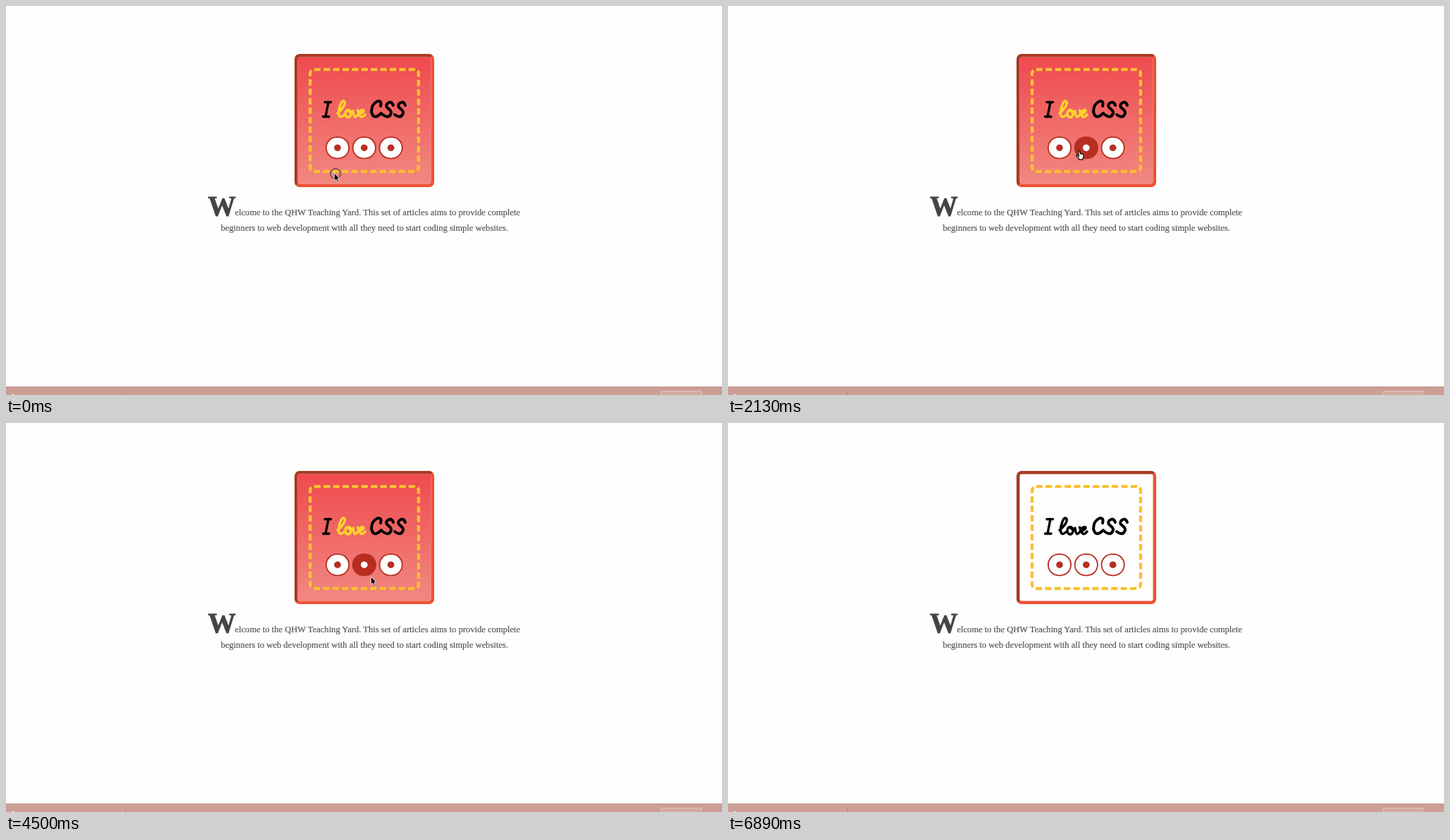
These frames come from a looping animation (1015x552 px, 7640 ms). An HTML page:

```html
<!DOCTYPE html>
<html lang="en">
<head>
<meta charset="utf-8">
<title>Card hover demo</title>
<style>
  html, body { margin: 0; width: 100%; height: 100%; overflow: hidden; background: #fefefe; }
  .card, .frame { position: absolute; box-sizing: border-box; }
  .card {
    left: 409px; top: 68.3px; width: 220px; height: 210px;
    transform: scale(.9); transform-origin: 0 0;
    border: 5px solid; border-color: #a93a24 #ee5232 #ee5232 #a93a24; border-radius: 8px;
  }
  .card.hover { background: linear-gradient(#ef484d, #f18a82) border-box; }
  .frame { left: 17px; top: 17px; width: 176px; height: 166px; border: 5px dashed #fbc02f; border-radius: 9px; }
  .bar { position: absolute; left: 0; top: 540px; width: 100%; height: 12px; background: #cd9e96; box-shadow: inset 0 1px #bb9089; overflow: hidden; }
  .bar i { position: absolute; box-sizing: border-box; }
  .divider { left: 169px; top: 6px; width: 1px; height: 6px; background: #b38881; }
  .mark { left: 8px; top: 11px; width: 4px; height: 1px; background: #f5e6e3; }
  .action { left: 928px; top: 6px; width: 59px; height: 20px; background: #d3a9a2; border: 1px solid #e2c3be; border-radius: 2px; }
  svg { position: absolute; left: 0; top: 0; }
  .title { fill: none; stroke: #000; stroke-width: 4; stroke-linecap: round; stroke-linejoin: round; }
  .copy { font: 12.55px "Liberation Serif", serif; fill: #555; stroke: #555; stroke-width: .2; }
  .initial { font: bold 39.5px "Liberation Serif", serif; fill: #444; stroke: #444; stroke-width: .8; }
</style>
</head>
<body>
<div class="card" id="card"><div class="frame"></div></div>
<div class="bar"><i class="divider"></i><i class="mark"></i><i class="action"></i></div>
<svg width="1015" height="552" viewBox="0 0 1015 552">
  <g class="title" role="img" aria-label="I love CSS">
    <path stroke-width="3.4" d="M452 136.5H460.5M449.5 157H458M457 136.5L453 157"/>
    <path id="love" stroke-width="3.5" d="M470 152Q482 142 480 136Q476 131 472 147Q470 163 480 154
      M485 147.5a4 5.2 0 1 0 .1 0Q487 153 492 149Q493 157 495 157.5Q502 154 498.5 148
      Q500 152 503 152.5Q509 149 506 147.5Q500 148 501 154Q504 161 509 154"/>
    <path d="M531 142Q533 134 527 135Q518 139 518 150Q521 163 532 152"/>
    <path id="s" d="M549 141q-3-8-9-2c-4 6 7 7 6 13q-3 9-12 2"/>
    <use href="#s" x="17"/>
  </g>
  <g id="buttons"></g>
  <text class="initial" x="286.3" y="297.3">W</text>
  <text class="copy" x="324.5" y="297">elcome to the QHW Teaching Yard. This set of articles aims to provide complete</text>
  <text class="copy" x="304.5" y="319">beginners to web development with all they need to start coding simple websites.</text>
  <g id="pointer">
    <circle id="ring" cx="2" cy="1" r="7.2" fill="none" stroke="#222"/>
    <path id="arrow" d="M.3 0V11L3 9L5 13L6.5 12L5 8H8Z" fill="#000" stroke="#fff" stroke-width=".8"/>
    <path id="hand" d="M-1 1Q0-.6 1 1L2 4.4L5 5Q8 6 5.7 10.5V12.6H0V11L-3.6 7.5Q-3.5 5 0 8Z" fill="#fff" stroke="#000" stroke-width="1.1"/>
  </g>
</svg>
<script>
const LOOP = 7640, RED = '#b72e20', PRESSED = '#e2492f', WHITE = '#fefefe';

// Each move eases the pointer from wherever it rests to a new point.
const moves = [
  { from: 0, to: 90, x: 465, y: 231 },
  { from: 270, to: 920, x: 469, y: 207 },
  { from: 1800, to: 2530, x: 535, y: 203 },
  { from: 2600, to: 2770, x: 541, y: 200 },
  { from: 2960, to: 3590, x: 508, y: 203 },
  { from: 4110, to: 4500, x: 517, y: 218 },
  { from: 4500, to: 4920, x: 524, y: 254 },
  { from: 4920, to: 5320, x: 530.5, y: 267 },
  { from: 6390, to: 6885, x: 938, y: 530 }
];
const exit = moves.at(-1).to;
const presses = [[0, 90], [1370, 1600], [3730, 3910]];

const $ = id => document.getElementById(id);
const show = (id, on) => $(id).setAttribute('visibility', on ? 'visible' : 'hidden');

function add(tag, attrs) {
  const el = document.createElementNS($('buttons').namespaceURI, tag);
  for (const name in attrs) el.setAttribute(name, attrs[name]);
  return $('buttons').appendChild(el);
}

const buttons = [0, 1, 2].map(i => {
  const cx = 470 + i * 37.8;
  return {
    cx,
    body: add('rect', { x: cx - 16.1, y: 186.1, width: 32.2, height: 30.2, rx: 15, stroke: RED, 'stroke-width': 1.8 }),
    icon: add('circle', { cx, cy: 201.2, r: 4.8 })
  };
});

function pointerAt(t) {
  let x = 465, y = 237;
  for (const move of moves) {
    const k = Math.min(1, Math.max(0, (t - move.from) / (move.to - move.from)));
    const eased = k * k * (3 - 2 * k);
    x += (move.x - x) * eased;
    y += (move.y - y) * eased;
  }
  return [x, y];
}

function draw(t) {
  const [x, y] = pointerAt(t);
  const pressed = presses.some(([from, to]) => t >= from && t < to);
  const inCard = y < 257;
  let overButton = false;

  for (const { cx, body, icon } of buttons) {
    const hover = Math.abs(x - cx) < 17 && y < 220;
    overButton ||= hover && y < 217.5;
    body.setAttribute('fill', !hover ? WHITE : pressed ? PRESSED : RED);
    icon.setAttribute('fill', hover ? WHITE : RED);
  }

  $('card').classList.toggle('hover', inCard);
  $('love').setAttribute('stroke', inCard ? '#fdd32f' : '#000');
  $('pointer').setAttribute('transform', `translate(${x} ${y})`);
  show('ring', pressed);
  show('hand', overButton);
  show('arrow', !overButton && t < exit);
}

const start = performance.now();
function tick() {
  draw((performance.now() - start) % LOOP);
  requestAnimationFrame(tick);
}
tick();
</script>
</body>
</html>
```
